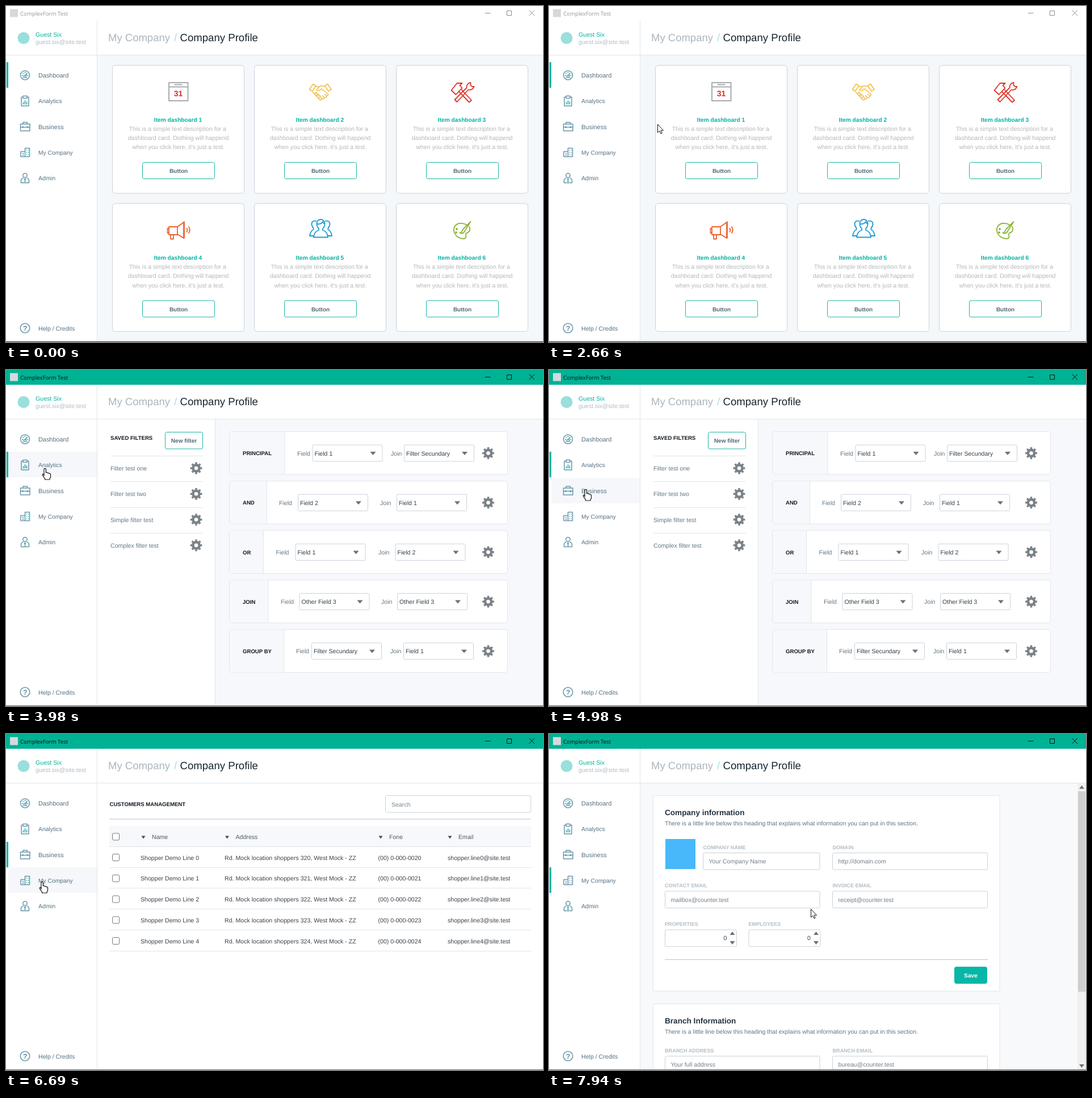
An HTML page that plays this animation: 946 px wide and 592 px high, repeating every 8 s.

```html
<!DOCTYPE html>
<html lang="en">
<head>
<meta charset="utf-8">
<title>ComplexForm Test</title>
<style>
html, body { margin: 0; width: 100%; height: 100%; overflow: hidden; background: #fff; }
svg { display: block; width: 946px; height: 592px; }
text { font-family: "Liberation Sans", Arial, sans-serif; text-rendering: geometricPrecision; white-space: pre; }
.bold { font-weight: bold; }
.window { font-family: "Open Sans", "Noto Sans", sans-serif; }
</style>
</head>
<body>
<svg id="stage" viewBox="0 0 946 592"></svg>
<script>
const LOOP = 8000, STEP = 76;
const TEAL = '#00b2a2', SLATE = '#547082', PALE = '#f6f8fb', RULE = '#e0e5eb', EDGE = '#cbd2d9';
const ROW_TOP = 99, ROW = 45.3;

// Drawing helpers
const text = (x, y, s, fill, { size = 10.6, bold, anchor = 'start' } = {}) =>
  `<text x="${x}" y="${y}" fill="${fill}" font-size="${size}" text-anchor="${anchor}"${bold ? ' class="bold"' : ''}>${s}</text>`;
const rect = (x, y, w, h, fill, stroke = 'none', r = 0) =>
  `<rect x="${x}" y="${y}" width="${w}" height="${h}" fill="${fill}" stroke="${stroke}" rx="${r}"/>`;
const line = (d, stroke, width = 1) =>
  `<path d="${d}" fill="none" stroke="${stroke}" stroke-width="${width}" stroke-linejoin="round"/>`;
const triangle = (x, y, w, h, fill = '#6b7278') =>
  `<path d="M${x - w / 2} ${y - h / 2}h${w}l${-w / 2} ${h}z" fill="${fill}"/>`;
const group = (id, body) => `<g id="${id}">${body}</g>`;
const caps = (x, y, s) => text(x, y, s, '#111a22', { size: 9.6, bold: true });
const gear = (x, y) => `<g transform="translate(${x} ${y})" fill="none" stroke="#7b8287">
  <circle r="5.6" stroke-width="4.6"/>
  <circle r="8.7" stroke-width="3.4" pathLength="16" stroke-dasharray="1 1" stroke-dashoffset=".5"/></g>`;
const outlineButton = (x, y, w, h, label) =>
  rect(x, y, w, h, '#fff', '#16b5a8', 3) +
  text(x + w / 2, y + h / 2 + 4, label, '#536879', { bold: true, anchor: 'middle' });

// Sidebar
const menu = [
  ['Dashboard', 10.9,
    'M41.5 122a8 8 0 1 1-16 0a8 8 0 1 1 16 0zM35.5 124a2 2 0 1 1-4 0a2 2 0 1 1 4 0z',
    'M34.5 122l3-4M28 122.5h2M29.5 118l1.3 1.3M33.5 116v2M37 122.5h2M29.5 126.5h1.5M36 126.5h1.5'],
  ['Analytics', 10.4, 'M30 160.5h-3v15.5h13v-15.5h-3M30 158.5h7v4h-7z', 'M30.5 173.5v-4M33.5 173.5v-7M36.5 173.5v-5'],
  ['Business', 11, 'M25.5 208h16.5v12h-16.5zM30 208v-3h7.5v3M25.5 213.5h16.5', 'M29.5 212v3M38 212v3'],
  ['My Company', 10.3, 'M33.5 250.5h8v15h-8zM26 256.5h7.5v9h-7.5z', 'M36 254h1M39 254h1M36 258h1M39 258h1M36 262h1M39 262h1M29 260h2M29 263h2'],
  ['Admin', 10.6, 'M37.2 298.5a3.7 3.7 0 1 1-7.4 0a3.7 3.7 0 1 1 7.4 0zM30.5 303q-4 1-4 4.500v4h14v-4q0-3.500-4-4.500', 'M33.500 304v6.500M32 305h3'],
];
const menuItem = ([label, size, body, accent], i) =>
  line(body, '#6c95a8', 1.5) + line(accent, '#14a9a2', 1.5) +
  text(57, (126 + i * ROW).toFixed(1), label, SLATE, { size });

const sidebar =
  rect(0, 26, 160, 566, '#fff') +
  `<rect id="hover" x="4" width="156" height="45" fill="#f5f7fa"/>
   <rect id="marker" x="1" width="3" height="45" fill="${TEAL}"/>` +
  menu.map(menuItem).join('') +
  `<circle cx="33.5" cy="567.5" r="8.3" fill="none" stroke="#6c95a8" stroke-width="1.5"/>` +
  text(33.6, 572, '?', '#5488a0', { size: 12, bold: true, anchor: 'middle' }) +
  text(57, 572, 'Help / Credits', SLATE);

const header =
  rect(161, 26, 785, 60, '#fff') +
  '<circle cx="31" cy="56.5" r="10.5" fill="#99dfdb"/>' +
  text(52, 54, 'Guest Six', TEAL) +
  text(52, 66.5, 'guest.six@site.test', '#b2bcc4') +
  text(180, 61.5, 'My Company', '#abb5bd', { size: 18.5 }) +
  text(296, 61.5, '/', '#a5dedb', { size: 18.5 }) +
  text(306.5, 61.5, 'Company Profile', '#15242e', { size: 18.6 }) +
  line('M0 86.5H946M160.5 26V591', RULE);

const windowBar =
  rect(0, 0, 946, 26, '#fff').replace('<rect', '<rect id="bar"') +
  rect(7, 5.5, 14, 14, '#d5d9dd') +
  '<text id="caption" class="window" x="25" y="16.5" font-size="9.7">ComplexForm Test</text>' +
  '<path id="controls" d="M844 12.500h9.500M882.500 8.500h8v8h-8zM921.500 7.500l9.500 9.500m0-9.500l-9.500 9.500" fill="none"/>' +
  rect(0, 591, 946, 1, '#222').replace('<rect', '<rect id="edge"');

// Dashboard
const art = [
  line('M287 135h33.500v32h-33.500zM287 142.500h33.500M296.500 138.500h14', '#a9abad', 2) +
    text(303.5, 159, '31', '#df2c20', { size: 14, bold: true, anchor: 'middle' }),
  line('M534.500 147l6.500-9.500 5 3-6.500 9.500zM573 147l-6.500-9.500-5 3 6.500 9.500zM546 141.500l5 1 4-2 6 1.500M552 142l-5 6q3 3 6 0l3-2 11 9q1 3-2 3.500l-4-3.500m4 3.500q0 3-4 3l-4-4m4 4q-1 3-4 2l-3-3m3 3q-2 3-5 1l-12-13M543 155l3-3 3 3-3 3M547 160l4-4 3 3-4 4', '#f2bd45', 1.6),
  line('M784.500 148.500l10-12.500h9l-4 4 4 4.500-11 11.500zM801 146l19 20-4 3.500-19-19.500M824.500 142a8 8 0 0 1-10 5.500l-20 21.500-4-4 21-21a8 8 0 0 1 7-9v5l3 2z', '#dd3426', 1.8),
  line('M287 389h15v14h-15zM287 392h-2.500v8h2.500M302 389l11-8v28l-11-7M314 379.500v30M290 403v7.500h5v-7.500M318 391q3 4 0 7.500M321.500 388.500q4.500 6 0 12', '#ec6130', 1.8),
  line('M547.500 383a7 7 0 0 1 14 0q0 7-3.500 9v3q8 2 9 12.500h-25q1-10.500 9-12.500v-3q-3.500-2-3.500-9zM547 379q-8-2-8.500 5 0 4 3 7v3q-5 2-6.500 11h7M562 379q8-2 8.500 5 0 4-3 7v3q5 2 6.500 11h-7M548 384q7 1 10-4 1 3 3 4', '#1b9ad6', 1.8),
  line('M812 386q-6-4-13-3a11.500 11.500 0 0 0-10 13c1 9 11 15 18 14q5-1 3-6-1-4 4-5 5-4 2-11M818.500 380l-13 13q-2 5-6 7 6 2 9-4zM794 392a1 1 0 1 0 .1 0M793 398a1 1 0 1 0 .1 0', '#8cb335', 1.8),
];
const copy = [
  ['This is a simple text description for a', 302.3, 219.5],
  ['dashboard card. Dothing will happend', 303.6, 235.8],
  ["when you click here, it's just a test.", 303.8, 252],
];
const card = (_, i) => {
  const dx = i % 3 * 250, dy = i > 2 ? 243.5 : 0;
  return `<g transform="translate(${dx} ${dy})">` +
    rect(187.5, 104.5, 232, 225.5, '#fff', EDGE, 5) +
    text(303, 203.5, 'Item dashboard ' + (i + 1), TEAL, { size: 10.2, bold: true, anchor: 'middle' }) +
    copy.map(([s, x, y]) => text(x, y, s, '#b3b7bb', { anchor: 'middle' })).join('') +
    outlineButton(240.5, 275.5, 127, 29, 'Button').replaceAll('font-size="10.6"', 'font-size="10"') + '</g>' + art[i];
};
const dashboard = rect(161, 87, 785, 505, '#f4f8fb') + art.map(card).join('');

// Analytics
const filters = ['Filter test one', 'Filter test two', 'Simple filter test', 'Complex filter test'];
const select = (x, y, value) =>
  rect(x + .5, y - 14.5, 123, 29, '#fff', EDGE, 2) +
  text(x + 4, y + 4, value, '#35404b') + triangle(x + 107, y + .5, 10, 6);
// label, divider x, field label x, field x, value, join label x, join x, value
const rules = [
  ['PRINCIPAL', 491, 513, 539.5, 'Field 1', 678, 701, 'Filter Secundary'],
  ['AND', 459.5, 481, 514, 'Field 2', 659, 688, 'Field 1'],
  ['OR', 453.5, 475.5, 509.5, 'Field 1', 656, 685.5, 'Field 2'],
  ['JOIN', 462, 484, 516.5, 'Other Field 3', 661, 689, 'Other Field 3'],
  ['GROUP BY', 489.5, 511, 538, 'Filter Secundary', 677, 700, 'Field 1'],
];
const ruleRow = ([label, split, fieldX, selectX, field, joinX, targetX, target], i) => {
  const y = 146.5 + i * 87.2;
  return rect(393.5, y - 38, 490, 75.5, '#fff', RULE, 4) +
    rect(394, y - 37.5, split - 394, 74.5, PALE, 'none', 4) +
    line(`M${split} ${y - 38}v75.500`, RULE) + caps(417, y + 3.7, label) +
    text(fieldX, y + 4, 'Field', '#637784') + select(selectX, y, field) +
    text(joinX, y + 4, 'Join', '#637784') + select(targetX, y, target) + gear(849.5, y);
};
const analytics =
  rect(161, 87, 207, 505, '#fff') + rect(368, 87, 578, 505, PALE) + line('M368.500 87V591', RULE) +
  caps(184, 123, 'SAVED FILTERS') + outlineButton(280.5, 109.5, 66, 29.5, 'New filter').replace('10.6', '10.1') +
  filters.map((name, i) => {
    const y = 173 + i * ROW;
    return line(`M184 ${Math.round(y - 22) + .5}H347`, RULE) + text(184, y + 4, name, '#637784') + gear(335, y);
  }).join('') + rules.map(ruleRow).join('');

// Business
const columns = [['Name', 257, 242], ['Address', 404.5, 389.5], ['Fone', 675, 660], ['Email', 797, 782]];
const checkbox = y => rect(187.5, y - 6, 12, 12, '#fff', '#777', 2);
const customer = i => {
  const y = 217.5 + i * 36.75, ink = '#3b434c';
  return checkbox(y) +
    text(237, y + 4, 'Shopper Demo Line ' + i, ink) +
    text(385, y + 4, `Rd. Mock location shoppers 32${i}, West Mock - ZZ`, ink) +
    text(655.5, y + 4, '(00) 0-000-002' + i, ink) +
    text(778, y + 4, `shopper.line${i}@site.test`, ink) +
    line(`M182 ${Math.round(y + 18) - .5}H925`, RULE);
};
const business =
  rect(161, 87, 785, 505, '#fff') + caps(182.5, 127, 'CUSTOMERS MANAGEMENT') +
  rect(668.5, 108.5, 256, 29.5, '#fff', EDGE, 2) + text(679, 127.5, 'Search', '#7d8891') +
  line('M182 150H925', '#dcdfe4', 2) + rect(182, 162, 743, 36, PALE) + line('M182 198.500H925', RULE) +
  checkbox(181) +
  columns.map(([s, x, arrow]) => triangle(arrow, 182, 7, 5, '#444c54') + text(x, 185, s, '#4d5965')).join('') +
  [0, 1, 2, 3, 4].map(customer).join('');

// My Company
const label = (x, y, s) => text(x, y, s, '#b2bec7', { size: 9.15, bold: true });
const input = (x, y, w, hint) =>
  rect(x, y, w, 29.5, '#fff', EDGE, 2) + text(x + 10, y + 18.7, hint, '#737f8a');
const spinner = x =>
  rect(x, 345, 126, 29.5, '#fff', EDGE, 2) + text(x + 109, 363, '0', '#35404b', { anchor: 'end' }) +
  triangle(x + 118.5, 351, 9, -6) + triangle(x + 118.5, 368, 9, 6);
const section = (y, h, title) =>
  rect(183.5, y, 610.5, h, '#fff', RULE, 2) +
  text(204, y + 34.3, title, '#24333f', { size: 13.6, bold: true }) +
  text(204, y + 52, 'There is a little line below this heading that explains what information you can put in this section.', '#607482', { size: 10.5 });
const company =
  rect(161, 87, 785, 505, '#f7f9fb') +
  section(108.5, 344.5, 'Company information') + rect(205, 185, 53, 53, '#48b8fb') +
  label(271.5, 202.5, 'COMPANY NAME') + input(271.5, 209.5, 205.5, 'Your Company Name') +
  label(499.5, 202.5, 'DOMAIN') + input(499.5, 209.5, 273, 'http://domain.com') +
  label(204, 270, 'CONTACT EMAIL') + input(204.5, 277, 272.5, 'mailbox@counter.test') +
  label(499.5, 270, 'INVOICE EMAIL') + input(499.5, 277, 273, 'receipt@counter.test') +
  label(204, 337.5, 'PROPERTIES') + spinner(204.5) + label(351.5, 337.5, 'EMPLOYEES') + spinner(352) +
  line('M204 397.500H773', '#bcc3ca') + rect(714, 410, 58, 30, '#08b6a7', 'none', 4) +
  text(743, 429, 'Save', '#fff', { size: 10.2, bold: true, anchor: 'middle' }) +
  section(475.5, 140, 'Branch Information') +
  label(204, 560.5, 'BRANCH ADDRESS') + input(204.5, 567.5, 272.5, 'Your full address') +
  label(499.5, 560.5, 'BRANCH EMAIL') + input(499.5, 567.5, 273, 'bureau@counter.test') +
  rect(931, 87, 15, 505, '#f0f0f0') + rect(932, 101, 13, 353, '#cdcdcd') +
  triangle(938.5, 93.5, 9, -6) + triangle(938.5, 585, 9, 6);

const pointer =
  '<path id="arrow" d="M.500.500v14.500l3.300-3 2.200 5 2.200-1-2.200-4.800h4.500z" fill="#fff" stroke="#111"/>' +
  '<path id="hand" d="M-2 11.500V1a1.700 1.700 0 0 1 3.400 0v5.500q2.500-.5 3 1 2-.6 2.800 1 2.300-.3 2.300 1.800v4q-.3 1.600-1.500 3.500v1.200h-8.500v-1.700q-3-3.500-4.300-6.500 0-2 1.600-1.400z" fill="#fff" stroke="#111" stroke-width="1.2"/>';

// Each view begins at its time; the index is also the marked menu row
const views = [['dashboard', 0, dashboard], ['analytics', 3980, analytics], ['business', 5840, business], ['company', 7160, company]];
document.getElementById('stage').innerHTML =
  rect(0, 0, 946, 592, '#fff') + views.map(([id, , body]) => group(id, body)).join('') +
  sidebar + header + windowBar + group('pointer', pointer);

// Pointer moves: start time, number of steps, evenly spaced points
const moves = [
  [430, 11, [[770, 580], [540, 482], [320, 410]]],
  [1280, 11, [[307, 403], [284, 389], [268, 365], [261, 332], [263, 300], [266, 279]]],
  [2120, 11, [[258, 272], [228, 240], [203, 211], [81, 184]]],
  [2970, 4, [[78, 181], [69, 174]]],
  [4520, 7, [[69, 178], [65, 211]]],
  [6300, 6, [[65, 216], [64, 261]]],
  [7560, 6, [[130, 269], [461, 308]]],
];
function pointerAt(t) {
  const move = moves.findLast(([start]) => start <= t);
  if (!move) return null;
  const [start, steps, points] = move;
  const step = Math.min(steps - 1, Math.floor((t - start) / STEP));
  const along = step / (steps - 1) * (points.length - 1);
  const i = Math.min(points.length - 2, Math.floor(along));
  return points[i].map((v, axis) => Math.round(v + (points[i + 1][axis] - v) * (along - i)));
}

const el = id => document.getElementById(id);
const set = (id, name, value) => el(id).setAttribute(name, value);
const show = (id, on) => set(id, 'display', on ? 'inline' : 'none');

function render(t) {
  const current = views.findLastIndex(([, start]) => start <= t);
  views.forEach(([id], i) => show(id, i === current));
  set('marker', 'y', Math.round(ROW_TOP + current * ROW));

  const active = t >= 3890;
  set('bar', 'fill', active ? '#00b294' : '#fff');
  set('caption', 'fill', active ? '#06130f' : '#969696');
  set('controls', 'stroke', active ? '#06130f' : '#8c8c8c');
  set('edge', 'fill', active ? '#686868' : '#202428');

  const at = pointerAt(t);
  const row = at && at[0] < 160 ? Math.floor((at[1] - ROW_TOP) / ROW) : -1;
  const over = row >= 0 && row < menu.length;
  show('hover', over);
  if (over) set('hover', 'y', Math.round(ROW_TOP + row * ROW));
  show('pointer', at);
  show('hand', over);
  show('arrow', !over);
  if (at) set('pointer', 'transform', `translate(${at})`);
}

function tick() {
  render(performance.now() % LOOP);
  requestAnimationFrame(tick);
}
tick();
</script>
</body>
</html>
```
